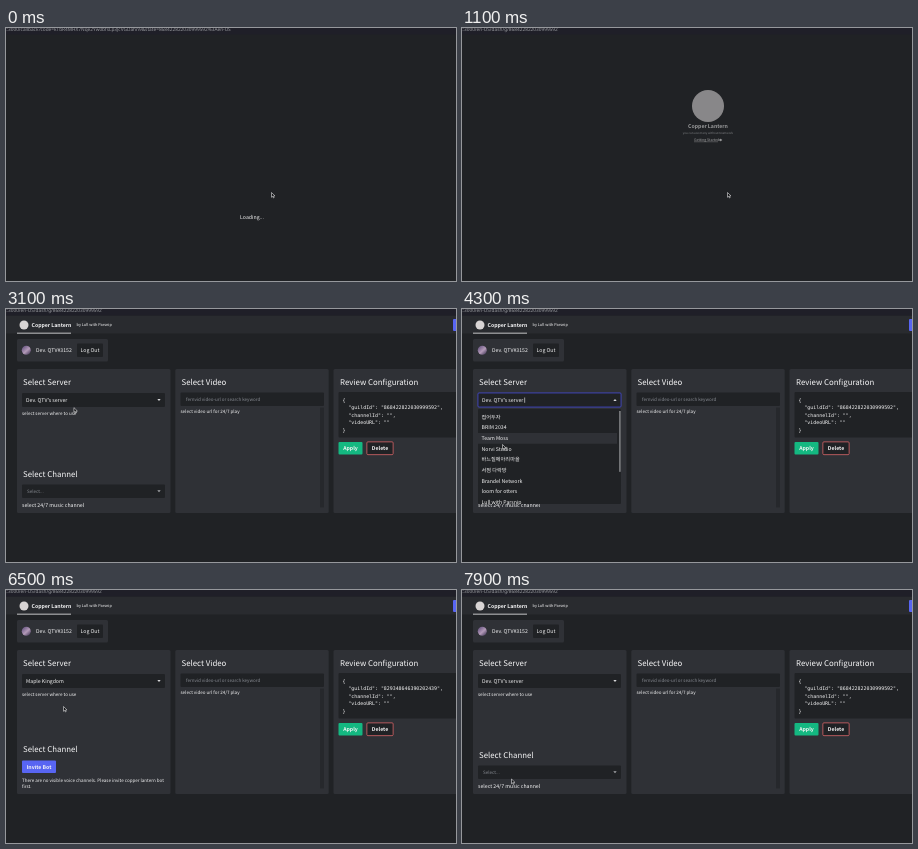
An HTML page with a canvas for the animation above (8000 ms loop, 450 px wide and 253 px high).

```html
<!DOCTYPE html>
<html lang="en">
<head>
<meta charset="utf-8">
<title>Dashboard</title>
<style>
html, body { margin: 0; width: 100%; height: 100%; overflow: hidden; background: #202225; }
canvas { display: block; width: 450px; height: 253px; }
</style>
</head>
<body>
<canvas id="stage"></canvas>
<script>
const W = 450, H = 253, LOOP = 8000, STEP = 100;
const SANS = '"Noto Sans CJK KR", "Noto Sans CJK JP", "Noto Sans CJK", "Noto Sans", sans-serif';
const MONO = '"DejaVu Sans Mono", "Noto Sans Mono", monospace';
const DARK = '#202225', CARD = '#2f3136', BAR = '#292b2f', WHITE = '#f6f6f7', GREY = '#888c93', BLUE = '#5865f2';
const SMALL = 4.52, BASE = 5.2, TITLE = 7.85;

const APP = 'Copper Lantern', TEAM = 'Lull with Parsnip', USER = 'Dev. QTV';
const HOME = USER + "'s server", OTHER = 'Maple Kingdom';
const HOME_ID = '868422822030999592', OTHER_ID = '829348646390202439';
const SERVERS = ['접어두자', 'BRIM 2034', 'Team Moss', 'Norvi Studio', '바느질메아리마을', '서점 다락방',
  'Brandel Network', 'loom for otters', TEAM, 'SORBAN', OTHER, HOME];

// Menu geometry
const MENU = { x: 16, y: 100, w: 143, h: 95, row: 10.65, first: 108, max: 36.4 };

// Cursor tip as [time, x, y]
const PATH = [[0, 265, 164], [1800, 265, 164], [2000, 260.5, 166], [2600, 150, 139], [3300, 47, 88],
  [3900, 47, 88], [4300, 40, 135], [4800, 47, 165], [5100, 50, 172], [5200, 50, 172], [5400, 51, 177],
  [5600, 51, 177], [6400, 57, 116], [6500, 57, 116], [6700, 56, 88], [6900, 56, 88], [7400, 49, 187],
  [7500, 49, 187], [7600, 49.5, 188], [7900, 49, 188.5]];

// Menu scroll as [time, offset]
const SCROLL = [[3900, 36.4], [4200, 0], [4300, 0], [4800, 36.4]];

const canvas = document.getElementById('stage');
const ctx = canvas.getContext('2d');
const ratio = window.devicePixelRatio || 1;
canvas.width = Math.round(W * ratio);
canvas.height = Math.round(H * ratio);

const clamp = v => Math.max(0, Math.min(1, v));
const smooth = v => v * v * (3 - 2 * v);
const ramp = (t, a, b) => smooth(clamp((t - a) / (b - a)));

function track(keys, t) {
  if (t <= keys[0][0]) return keys[0].slice(1);
  for (let i = 1; i < keys.length; i++) {
    const a = keys[i - 1], b = keys[i];
    if (t <= b[0]) {
      const p = smooth((t - a[0]) / (b[0] - a[0]));
      return a.slice(1).map((v, k) => v + (b[k + 1] - v) * p);
    }
  }
  return keys[keys.length - 1].slice(1);
}

function box(x, y, w, h, fill, r = 1) {
  ctx.fillStyle = fill;
  ctx.beginPath();
  ctx.roundRect(x, y, w, h, r);
  ctx.fill();
}

function outline(x, y, w, h, color) {
  const line = 0.7;
  ctx.strokeStyle = color;
  ctx.lineWidth = line;
  ctx.beginPath();
  ctx.roundRect(x + line / 2, y + line / 2, w - line, h - line, 1);
  ctx.stroke();
}

function disc(x, y, r, fill) {
  ctx.fillStyle = fill;
  ctx.beginPath();
  ctx.arc(x, y, r, 0, Math.PI * 2);
  ctx.fill();
}

// y is the middle of the capitals
function text(s, x, y, size = BASE, color = WHITE, weight = 400, align = 'left', family = SANS) {
  ctx.font = `${weight} ${size}px ${family}`;
  ctx.textAlign = align;
  ctx.fillStyle = color;
  ctx.fillText(s, x, y + size * 0.35);
}

function button(label, x, y, w, h, fill, weight = 700) {
  box(x, y, w, h, fill);
  text(label, x + w / 2, y + h / 2, BASE, WHITE, weight, 'center');
}

function arrow(x, y, color, dir = 1) {
  ctx.fillStyle = color;
  ctx.beginPath();
  ctx.moveTo(x - 1.7, y - dir);
  ctx.lineTo(x + 1.7, y - dir);
  ctx.lineTo(x, y + dir * 0.9);
  ctx.fill();
}

function addressBar(t) {
  box(0, 0, W, 6.5, '#1f1f28', 0);
  const url = t < 100
    ? `t:3000/callback?code=kTbR4MHX7Nqe2Yw0bfsLp3JcVGDahn9&state=${HOME_ID}%3Aen-US`
    : `t:3000/en-US/dash/g/${HOME_ID}`;
  text(url, -1, 1.5, 4.75, '#9a9ca0', 400, 'left', '"Noto Sans", sans-serif');
}

function intro() {
  disc(246, 78, 16, '#d8d4d4');
  text(APP, 246, 98.5, BASE, WHITE, 700, 'center');
  text('you can use many without teamwork', 246, 105.3, 2.95, '#c4c6ca', 400, 'center');
  text('Getting Started', 232, 112, 3.6, WHITE);
  box(232, 113.7, 24, 0.4, WHITE, 0);
  box(257, 111.6, 2, 0.8, WHITE, 0);
  ctx.beginPath();
  ctx.moveTo(258.4, 110.5);
  ctx.lineTo(260.3, 112);
  ctx.lineTo(258.4, 113.5);
  ctx.fill();
}

function header() {
  box(0, 6.5, W, 18, BAR, 0);
  disc(18, 16, 4.5, '#d8d4d4');
  text(APP, 25.5, 16, BASE, WHITE, 700);
  text('by ' + TEAM, 70.5, 16, 3.9, WHITE);
  box(11, 23.8, 54, 0.7, WHITE, 0);
  box(447, 10, 20, 12, BLUE);

  box(11, 30, 91, 22.5, CARD, 1.5);
  const face = ctx.createLinearGradient(16, 37, 24, 46);
  face.addColorStop(0, '#5b4a78');
  face.addColorStop(0.55, '#b39ab8');
  face.addColorStop(1, '#3c3050');
  disc(20.3, 41.3, 4.5, face);
  text(USER + '#3152', 30, 41.5);
  button('Log Out', 71, 34.5, 26, 13.5, DARK, 400);
}

function channelCard(other) {
  if (other) {
    text('Select Channel', 17, 159, TITLE, WHITE, 500);
    button('Invite Bot', 16, 170.5, 34, 12.5, BLUE);
    text(`There are no visible voice channels. Please invite ${APP.toLowerCase()} bot`, 16, 190, SMALL);
    text('first.', 16, 196.5, SMALL);
  } else {
    text('Select Channel', 17, 165.5, TITLE, WHITE, 500);
    box(16, 175.5, 143, 13.5, DARK);
    text('Select...', 21, 182.5, SMALL, GREY);
    arrow(153, 182.3, '#a6a8ac');
    text('select 24/7 music channel', 16, 196);
  }
}

function configCard(id) {
  box(327.5, 60, 140, 144, CARD, 1.5);
  text('Review Configuration', 334, 73, TITLE, WHITE, 500);
  box(332.5, 83, 130, 45.5, DARK);
  ['{', `  "guildId": "${id}",`, '  "channelId": "",', '  "videoURL": ""', '}'].forEach((line, i) =>
    text(line, 336.5, 90.8 + i * 7.5, 4.92, WHITE, 400, 'left', MONO));
  button('Apply', 332.5, 133, 24, 12.5, '#14b881');
  button('Delete', 360.5, 132.5, 27, 13.5, DARK);
  outline(360.5, 132.5, 27, 13.5, '#f47174');
}

function menu(scroll, hover) {
  const { x, y, w, h, row, first, max } = MENU;
  box(x, y, w, h, DARK);
  ctx.save();
  ctx.beginPath();
  ctx.rect(x, y, w, h);
  ctx.clip();
  SERVERS.forEach((name, i) => {
    const mid = first + i * row - scroll;
    if (i === hover) box(x, mid - row / 2, 139, row, CARD, 0);
    text(name, 19.5, mid);
  });
  ctx.restore();
  box(157.5, 102 + 31 * scroll / max, 0.9, 61, '#c4c6c9', 0.4);
}

function hoverRow(t, y, scroll) {
  if (t < 4000 || t < 7000 && t >= 6900) return SERVERS.indexOf(t < 4000 ? HOME : OTHER);
  if (t >= 4100 && t <= 4300) return 2;
  if (y < MENU.y) return SERVERS.indexOf(t < 6000 ? HOME : OTHER);
  const i = Math.round((y + 1 - MENU.first + scroll) / MENU.row);
  return Math.max(0, Math.min(SERVERS.length - 1, i));
}

function dashboard(t, cursorY) {
  const other = t >= 5600 && t < 7800;
  const open = t >= 3500 && t < 5600 || t >= 6900 && t < 7800;

  header();
  box(11, 60, 153.5, 144, CARD, 1.5);
  text('Select Server', 17, 73, TITLE, WHITE, 500);
  text('select server where to use', 16, 104.3, SMALL);
  channelCard(other);
  box(16, 84, 143, 14, DARK);
  text(other ? OTHER : HOME, 20, 91.3);
  arrow(153, 91, '#d6d7d9', open ? -1 : 1);

  box(169.3, 60, 153.4, 144, CARD, 1.5);
  text('Select Video', 175.5, 73, TITLE, WHITE, 500);
  box(174.5, 83.5, 143.5, 13.5, DARK);
  text('fernvid video-url or search keyword', 180, 90.3, SMALL, GREY);
  text('select video url for 24/7 play', 174.5, 102.3, SMALL);
  box(314, 98.5, 4, 100, '#26282c', 0);

  configCard(other ? OTHER_ID : HOME_ID);

  if (open) {
    outline(15.6, 83.6, 143.8, 14.8, '#4850f0');
    if ((t + 100) % 1000 < 500) box(62.5, 88.5, 0.6, 5.2, WHITE, 0);
    const scroll = t < 6000 ? track(SCROLL, t)[0] : MENU.max;
    menu(scroll, hoverRow(t, cursorY, scroll));
  }
}

function pointer(x, y) {
  const size = 0.82;
  ctx.beginPath();
  [[0, 0], [0, 5.8], [1.4, 4.6], [2.3, 6.6], [3.2, 6.2], [2.4, 4.2], [4.2, 4.1]]
    .forEach(([dx, dy]) => ctx.lineTo(x + 0.5 + dx * size, y + 0.5 + dy * size));
  ctx.closePath();
  ctx.fillStyle = '#111214';
  ctx.fill();
  ctx.strokeStyle = '#e6e6e8';
  ctx.lineWidth = 0.6;
  ctx.stroke();
}

function faded(alpha, dy, paint) {
  if (alpha <= 0) return;
  ctx.save();
  ctx.globalAlpha = alpha;
  ctx.translate(0, dy);
  paint();
  ctx.restore();
}

function draw(t) {
  ctx.setTransform(ratio, 0, 0, ratio, 0, 0);
  ctx.textRendering = 'geometricPrecision';
  ctx.textBaseline = 'alphabetic';
  box(0, 0, W, H, DARK, 0);
  const [x, y] = track(PATH, t);

  faded(1 - ramp(t, 0, 300), 0, () => text('Loading...', 246, 188.7, BASE, WHITE, 400, 'center'));
  faded(ramp(t, 100, 700) * (1 - ramp(t, 850, 1400)), 0, intro);
  const shown = ramp(t, 1150, 1800);
  faded(shown, 5 * (1 - shown), () => dashboard(t, y));
  addressBar(t);
  pointer(x, y);
}

function frame() {
  const t = performance.now() % LOOP;
  draw(Math.floor(t / STEP) * STEP);
  requestAnimationFrame(frame);
}
frame();
</script>
</body>
</html>
```
